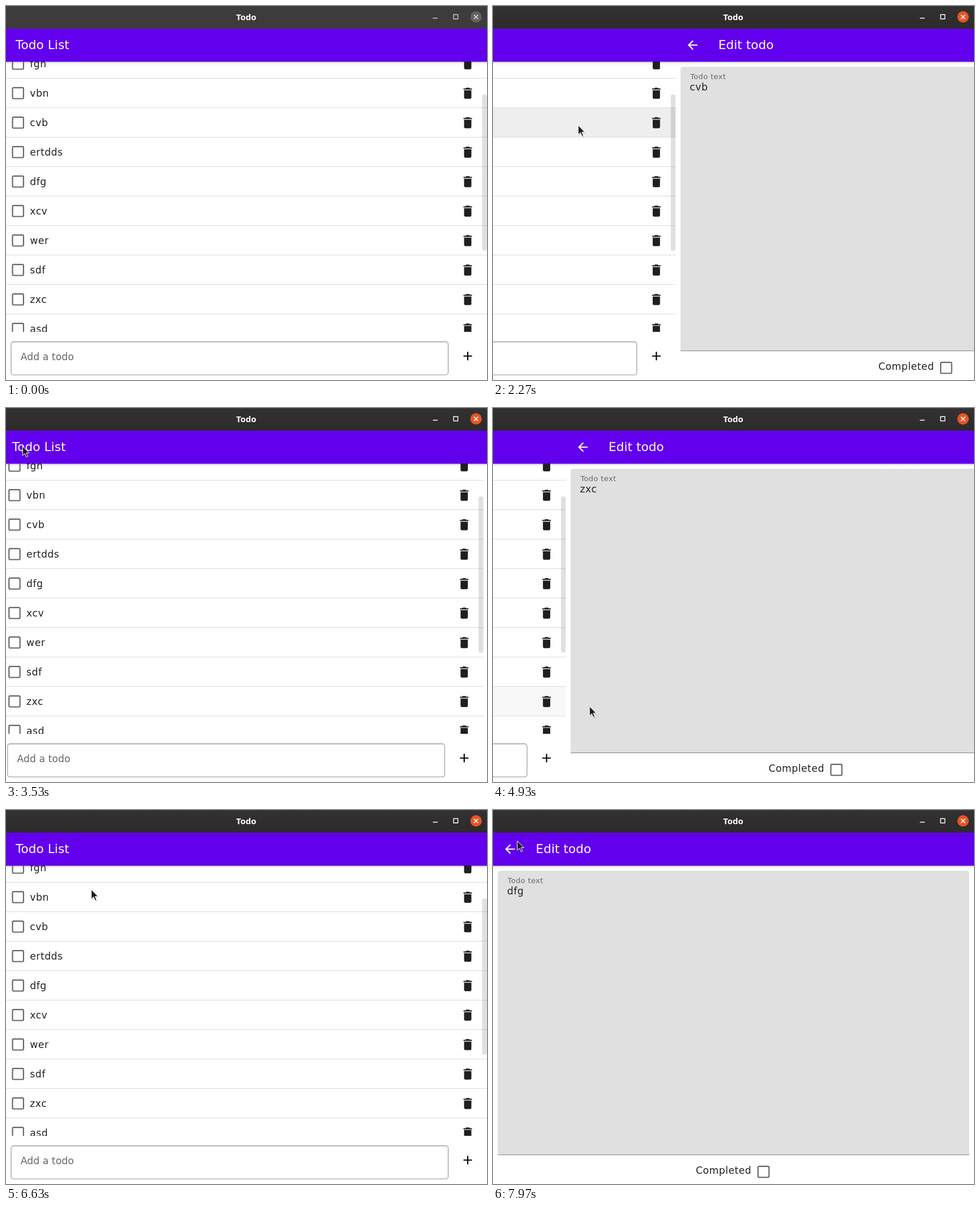
Write an HTML page that moves like this. It is 849 px wide and 660 px high and loops after 8000 ms.

```html
<!DOCTYPE html>
<html lang="en">
<head>
<meta charset="utf-8">
<title>Todo</title>
<style>
  html, body { margin: 0; width: 100%; height: 100%; overflow: hidden; background: #fff; }
  svg { display: block; width: 849px; height: 660px; }
  text { font-family: "DejaVu Sans", sans-serif; white-space: pre; }
  .heading { font-size: 21.5px; letter-spacing: .1px; fill: #fff; }
  .body { font-size: 17.2px; letter-spacing: .5px; fill: #212121; }
  .hint { font-size: 17.1px; letter-spacing: .1px; fill: #666; }
  .caption { font-size: 12.9px; letter-spacing: .43px; fill: #666; }
  .title { font: 700 15px "Open Sans", sans-serif; fill: #fff; text-anchor: middle; }
  .box { fill: none; stroke: #666; stroke-width: 2.15px; }
</style>
</head>
<body>
<svg viewBox="0 0 849 660">
  <defs>
    <linearGradient id="shade" x2="0" y2="1">
      <stop offset="0" stop-color="#000" stop-opacity=".16"/>
      <stop offset=".4" stop-color="#000" stop-opacity=".05"/>
      <stop offset="1" stop-color="#000" stop-opacity="0"/>
    </linearGradient>
    <linearGradient id="bar" x2="0" y2="1">
      <stop offset="0" stop-color="#343132"/>
      <stop offset="1" stop-color="#2d2a2b"/>
    </linearGradient>
    <clipPath id="listClip"><rect y="98" width="849" height="477"/></clipPath>
    <clipPath id="rowClip"><rect id="rowBox" width="849" height="51"/></clipPath>
    <path id="trash" d="M6 19c0 1.1.9 2 2 2h8c1.1 0 2-.9 2-2V7H6v12zM19 4h-3.5l-1-1h-5l-1 1H5v2h14V4z" transform="scale(1.075) translate(-12 -12)" fill="#1f1f1f"/>
    <rect id="check" x="-9.7" y="-9.7" width="19.4" height="19.4" rx="2" class="box"/>
  </defs>

  <rect y="39" width="849" height="59.5" fill="#6200ee"/>
  <rect y="98.5" width="849" height="6" fill="url(#shade)"/>

  <g id="list">
    <text class="heading" x="17" y="76.3">Todo List</text>
    <g clip-path="url(#listClip)">
      <g clip-path="url(#rowClip)"><circle id="rowRipple"/></g>
      <g id="rows"></g>
      <rect x="840.4" y="156" width="8.6" height="276" rx="4" fill="#000" fill-opacity=".12"/>
    </g>
    <rect x="9" y="592.6" width="771.5" height="58.4" rx="4.3" fill="none" stroke="#8f8f8f" stroke-width="1.1"/>
    <text class="hint" x="25.8" y="625">Add a todo</text>
    <path d="M19 13h-6v6h-2v-6H5v-2h6V5h2v6h6v2z" transform="translate(815 617.8) scale(1.075) translate(-12 -12)"/>
  </g>

  <g id="edit">
    <circle id="backRipple" cx="30" cy="69" fill="#fff"/>
    <path d="M20 11H7.83l5.59-5.59L12 4l-8 8 8 8 1.41-1.41L7.83 13H20v-2z" transform="translate(30 69) scale(1.075) translate(-12 -12)" fill="#fff"/>
    <text class="heading" x="75.5" y="76.3">Edit todo</text>
    <path d="M8.6 609V111.6a4.3 4.3 0 0 1 4.3-4.3H836.2a4.3 4.3 0 0 1 4.3 4.3V609Z" fill="#e0e0e0"/>
    <rect x="8.6" y="608" width="831.9" height="1" fill="#808080"/>
    <text class="caption" x="25.8" y="128.5">Todo text</text>
    <text class="body" id="value" x="25" y="148.6"></text>
    <text class="body" x="358" y="642">Completed</text>
    <use href="#check" x="477.5" y="638.5"/>
  </g>

  <rect width="849" height="40" fill="#3e3b3c"/>
  <rect id="activeBar" width="849" height="40" fill="url(#bar)"/>
  <rect width="849" height="1" fill="#fff" fill-opacity=".08"/>
  <text class="title" x="424" y="25">Todo</text>
  <circle cx="829.7" cy="19.3" r="10" fill="#636061"/>
  <circle id="activeClose" cx="829.7" cy="19.3" r="10" fill="#e95420"/>
  <g id="controls" fill="none" stroke="#fff" stroke-width="1.4">
    <path d="M753.5 21.5h8.5M790 15.2h7.6v7.6h-7.6z"/>
    <path d="M826 15.6l7.4 7.4M833.4 15.6l-7.4 7.4" stroke-width="1.7"/>
  </g>

  <g id="cursor">
    <path d="M.7 1.2V18l4-3.6 2.8 6.4 2.8-1.2-2.7-6.2h5.2Z" fill="#000" fill-opacity=".18" transform="translate(.8 1)"/>
    <path d="M.3.5V17l3.9-3.5 2.8 6.3 2.6-1.1-2.7-6.2h5.1Z" fill="#1c1c1c" stroke="#fff" stroke-width="1"/>
  </g>
</svg>

<script>
const LOOP = 8000, W = 849, ROW = 52;
const HOLD = 185, SLIDE = 300, SPREAD = 225;
const ENTER = 200, WANDER = 1130;

const $ = id => document.getElementById(id);
const clamp = v => Math.max(0, Math.min(1, v));
const mix = (a, b, s) => a + (b - a) * s;
const smooth = s => s * s * (3 - 2 * s);
const set = (el, attrs) => { for (const k in attrs) el.setAttribute(k, attrs[k]); };

const names = "fgh vbn cvb ertdds dfg xcv wer sdf zxc asd".split(" ");
const rowY = i => 102 + i * ROW;
$("rows").innerHTML = names.map((name, i) => {
  const y = rowY(i);
  return `<use href="#check" x="21.2" y="${y - .2}"/>
    <text class="body" x="42.3" y="${y + 6}">${name}</text>
    <use href="#trash" x="815" y="${y}"/>
    <rect y="${y + 25}" width="${W}" height="1" fill="#dadada"/>`;
}).join("");

// Presses that open a todo, and presses on the back arrow
const opens = [{ at: 1965, name: "cvb" }, { at: 4575.7, name: "zxc" }, { at: 7390, name: "dfg" }];
const backs = [{ at: 3080 }, { at: 5925 }];

const moves = [
  { from: 1560, to: 1730, x: 150, y: 210 },
  { from: 2350, to: 2830, x: 29, y: 67 },
  { from: 3580, to: 4370, x: 170, y: 526 },
  { from: 4980, to: 5170, x: 69, y: 195 },
  { from: 5350, to: 5730, x: 27, y: 64 },
  { from: 6180, to: 6430, x: 151, y: 132 },
  { from: 6595, to: 6870, x: 136, y: 300 },
  { from: 7050, to: 7200, x: 136, y: 322 },
  { from: 7690, to: 7970, x: 42.5, y: 54 }
];

// The pointer loops over the list first, then eases from stop to stop
function pointer(t) {
  const w = clamp((t - ENTER) / WANDER);
  let x = 105 - 85 * Math.cos(8.25 * w), y = 224 - 180 * Math.sin(Math.PI * w);
  for (const m of moves) {
    const s = smooth(clamp((t - m.from) / (m.to - m.from)));
    x = mix(x, m.x, s);
    y = mix(y, m.y, s);
  }
  return { x, y };
}

// cubic-bezier(.4, 0, .2, 1)
function ease(x) {
  if (x <= 0 || x >= 1) return clamp(x);
  let lo = 0, hi = 1;
  for (let n = 0; n < 24; n++) {
    const s = (lo + hi) / 2, r = 1 - s;
    if (1.2 * s * r * r + .6 * s * s * r + s * s * s < x) lo = s; else hi = s;
  }
  return smooth(lo);
}

const latest = (list, t) => list.filter(e => e.at <= t).pop();
const slid = (press, t) => press ? ease((t - press.at - HOLD) / SLIDE) : 0;
const fade = dt => clamp(dt / 40) * clamp(1 - (dt - SPREAD - 15) / 150);

function draw(t) {
  const open = latest(opens, t), back = latest(backs, t);
  const shown = back && back.at > open.at ? 1 - slid(back, t) : slid(open, t);
  set($("list"), { transform: `translate(${-W * shown} 0)` });
  set($("edit"), { transform: `translate(${W * (1 - shown)} 0)`, visibility: shown > 0 ? "visible" : "hidden" });

  if (open) {
    const dt = t - open.at, grow = ease(dt / SPREAD);
    const p = pointer(open.at), y = rowY(names.indexOf(open.name));
    $("value").textContent = open.name;
    set($("rowBox"), { y: y - 26 });
    set($("rowRipple"), {
      cx: mix(p.x, W / 2, grow), cy: mix(p.y, y, grow), r: mix(255, 435, grow),
      "fill-opacity": .12 * fade(dt)
    });
  } else set($("rowRipple"), { "fill-opacity": 0 });

  const dt = back ? t - back.at : LOOP;
  set($("backRipple"), { r: mix(15.6, 26, ease(dt / SPREAD)), "fill-opacity": .24 * fade(dt) });

  // The first press also gives the window focus
  const active = clamp((t - opens[0].at) / 120);
  set($("activeBar"), { opacity: active });
  set($("activeClose"), { opacity: active });
  set($("controls"), { "stroke-opacity": mix(.75, 1, active) });

  const { x, y } = pointer(t);
  set($("cursor"), { transform: `translate(${x} ${y})`, visibility: t < ENTER ? "hidden" : "visible" });
}

function tick() {
  draw(performance.now() % LOOP);
  requestAnimationFrame(tick);
}
tick();
</script>
</body>
</html>
```
